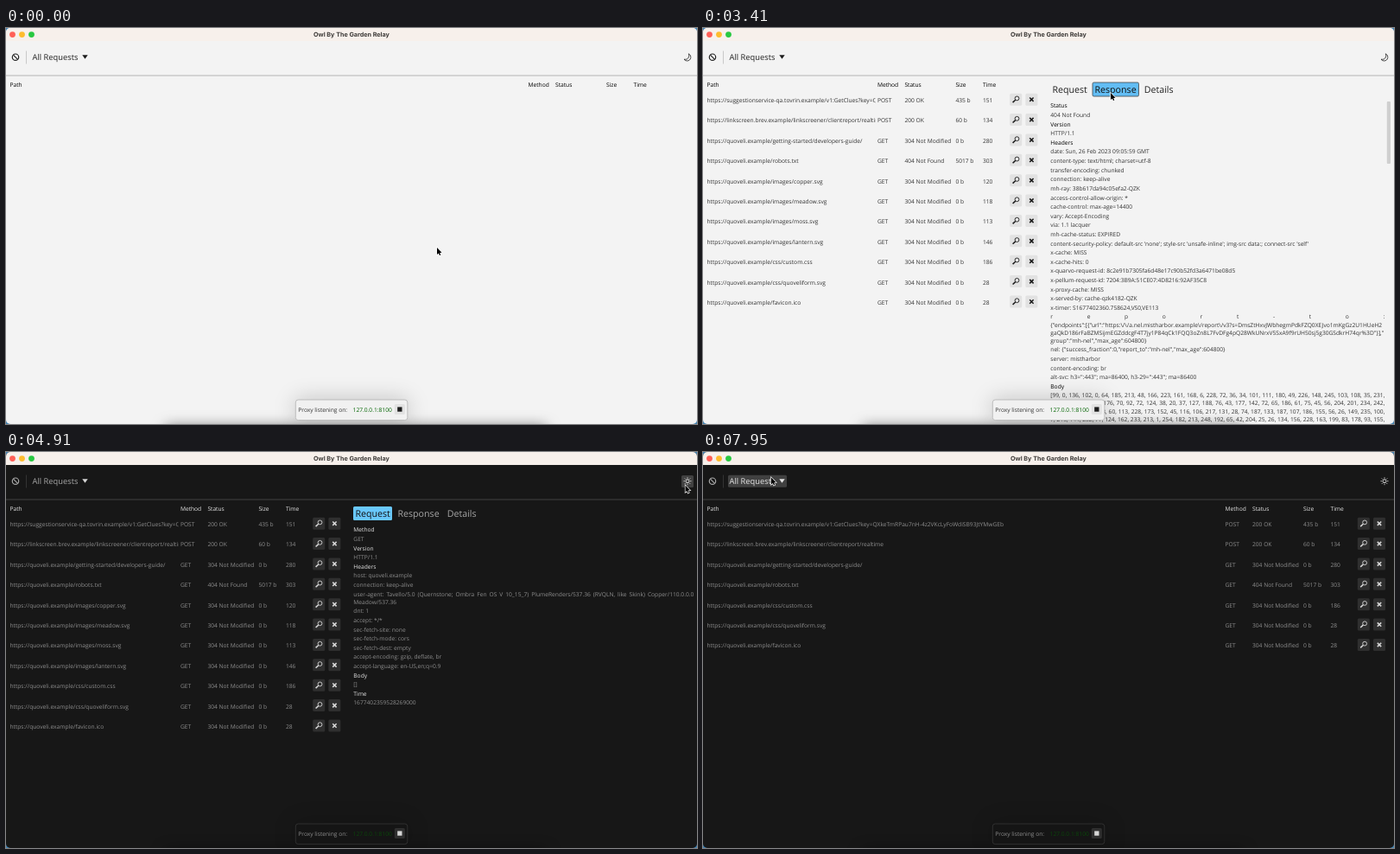
Animation, 800 px wide and 458 px high, one loop 8000 ms. Source, as an HTML page with a canvas:

```html
<!DOCTYPE html>
<html lang="en">
<head>
<meta charset="utf-8">
<title>Request list</title>
<style>
  html, body { margin: 0; width: 100%; height: 100%; overflow: hidden; }
  canvas { display: block; width: 800px; height: 458px; }
</style>
</head>
<body>
<canvas id="stage"></canvas>
<script>
const canvas = document.getElementById('stage');
const dpr = window.devicePixelRatio || 1;
canvas.width = 800 * dpr;
canvas.height = 458 * dpr;
const ctx = canvas.getContext('2d');
ctx.scale(dpr, dpr);
ctx.textRendering = 'geometricPrecision';

const LOOP = 8000;
const SMALL = 6.67, MEDIUM = 9.33, LARGE = 10.67;
const FONT = '"Open Sans", "Noto Sans", sans-serif';

const LIGHT = {
  bg: '#f3f3f3', text: '#333', strong: '#000', tool: '#222', icon: '#1c1c1c', line: '#b4b4b4', divider: '#c9c9c9',
  button: '#e2e2e2', hover: '#a0a0a0', edge: '#222', toast: '#f1f1f1', toastEdge: '#b2b2b2', address: '#006400'
};
const DARK = {
  bg: '#171717', text: '#8e8e8e', strong: '#e6e6e6', tool: '#a6a6a6', icon: '#d6d6d6', line: '#404040', divider: '#333',
  button: '#2f2f2f', hover: '#414141', edge: '#555', toast: '#151515', toastEdge: '#363636', address: '#0b460b'
};

// When each thing happens, in ms.
const BLUR = 590, FOCUS = 1860, OPEN = 2700, RESPONSE = 3200, REQUEST = 4100, TOGGLE = 4900, CLOSE = 5750;

const site = 'https://quoveli.example/';
const unchanged = '304 Not Modified';
// path, method, status, size, time, shown at, removed at
const rows = [
  ['https://suggestionservice-qa.tovrin.example/v1:GetClues?key=QXkeTmRPau7nH-4z2VKcLyFoWdiSB93JtYMwGEb', 'POST', '200 OK', '435 b', 151, 640],
  ['https://linkscreen.brev.example/linkscreener/clientreport/realtime', 'POST', '200 OK', '60 b', 134, 640],
  [site + 'getting-started/developers-guide/', 'GET', unchanged, '0 b', 280, 960],
  [site + 'robots.txt', 'GET', '404 Not Found', '5017 b', 303, 1110],
  [site + 'images/copper.svg', 'GET', unchanged, '0 b', 120, 1160, 6300],
  [site + 'images/meadow.svg', 'GET', unchanged, '0 b', 118, 1210, 5450],
  [site + 'images/moss.svg', 'GET', unchanged, '0 b', 113, 1260, 6500],
  [site + 'images/lantern.svg', 'GET', unchanged, '0 b', 146, 1310, 6700],
  [site + 'css/custom.css', 'GET', unchanged, '0 b', 186, 1360],
  [site + 'css/quoveliform.svg', 'GET', unchanged, '0 b', 28, 1410],
  [site + 'favicon.ico', 'GET', unchanged, '0 b', 28, 1460]
];

// time, x, y of the pointer tip
const pointerPath = [
  [0, 499, 254], [210, 499, 254], [270, 265, 223], [590, 265, 223], [640, 180, 210], [960, 180, 210],
  [1500, 87, 197], [1860, 87, 197], [2450, 762, 148.5], [2700, 762, 148.5], [3150, 472, 75], [3600, 472, 75],
  [4020, 424, 73], [4370, 424, 73], [4680, 786.5, 38.5], [5230, 786.5, 38.5], [5420, 380, 198], [5500, 380, 198],
  [5680, 361, 152], [5760, 361, 152], [5870, 427, 150.5], [6200, 782, 175], [6880, 782, 175],
  [7680, 140, 36], [7730, 140, 36], [7930, 79, 29.5], [8000, 79, 29.5]
];

let theme, pointer;

function pointerAt(t) {
  const i = pointerPath.findIndex(key => key[0] > t);
  const [t0, x0, y0] = pointerPath[i - 1], [t1, x1, y1] = pointerPath[i];
  const k = (t - t0) / (t1 - t0), ease = k * k * (3 - 2 * k);
  return { x: x0 + (x1 - x0) * ease, y: y0 + (y1 - y0) * ease };
}

function setFont(size, weight = 400, family = FONT) {
  ctx.font = `${weight} ${size}px ${family}`;
}

// y is the middle of the capitals.
function text(value, x, y, color = theme.text, size = SMALL) {
  setFont(size);
  ctx.fillStyle = color;
  ctx.fillText(value, x, y + size * 0.36);
}

function justify(parts, x, y, width) {
  setFont(SMALL);
  const widths = parts.map(part => ctx.measureText(part).width);
  const gap = parts.length > 1 ? (width - widths.reduce((a, b) => a + b)) / (parts.length - 1) : 0;
  parts.forEach((part, i) => {
    text(part, x, y);
    x += widths[i] + gap;
  });
}

function box(x, y, w, h, r, fill, edge) {
  ctx.beginPath();
  ctx.roundRect(x, y, w, h, r);
  ctx.fillStyle = fill;
  ctx.fill();
  if (edge) {
    ctx.strokeStyle = edge;
    ctx.lineWidth = 0.8;
    ctx.stroke();
  }
}

function dot(x, y, r, fill) {
  ctx.beginPath();
  ctx.arc(x, y, r, 0, 7);
  ctx.fillStyle = fill;
  ctx.fill();
}

function stroke(color, width, ...lines) {
  ctx.strokeStyle = color;
  ctx.lineWidth = width;
  ctx.beginPath();
  for (const [x0, y0, x1, y1] of lines) {
    ctx.moveTo(x0, y0);
    ctx.lineTo(x1, y1);
  }
  ctx.stroke();
}

function ring(x, y, r, color, width) {
  ctx.beginPath();
  ctx.arc(x, y, r, 0, 7);
  ctx.strokeStyle = color;
  ctx.lineWidth = width;
  ctx.stroke();
}

function hovered(x, y, w, h) {
  return pointer.x >= x && pointer.x <= x + w && pointer.y >= y && pointer.y <= y + h;
}

function polygon(points, fill) {
  ctx.beginPath();
  points.forEach(([x, y]) => ctx.lineTo(x, y));
  ctx.closePath();
  ctx.fillStyle = fill;
  ctx.fill();
}

// Response text, with a seeded token and body bytes.
let seed = 7;
const random = n => (seed = (seed * 16807) % 2147483647) % n;
const width = value => ctx.measureText(value).width;
const LETTERS = 'ABCDEFGHJKLMNPQRSTUVWXYZabcdefghijkmnopqrstuvwxyz0123456789';

function fill(start, limit, next) {
  let line = start;
  for (let more = line + next(); width(more) <= limit; more = line + next()) line = more;
  return line;
}

setFont(SMALL);
const letter = () => LETTERS[random(LETTERS.length)];
const byte = () => random(256) + ', ';
const tokenEnd = '%3D"}],"';
const tokenLines = [
  fill('{"endpoints":[{"url":"https:\\/\\/a.nel.mistharbor.example\\/report\\/v3?s=', 387, letter),
  fill('', 387 - width(tokenEnd), letter) + tokenEnd
];
const bodyLines = ['[99, 0, 136, 102, 0, 64, ', '', '', ''].map(start => fill(start, 389, byte).trim());

// '#' marks a heading; a line break continues a justified paragraph.
const responseText = [
  '#Status', '404 Not Found', '#Version', 'HTTP/1.1', '#Headers',
  'date: Sun, 26 Feb 2023 09:05:59 GMT', 'content-type: text/html; charset=utf-8', 'transfer-encoding: chunked',
  'connection: keep-alive', 'mh-ray: 38b617da94c05efa2-QZK', 'access-control-allow-origin: *',
  'cache-control: max-age=14400', 'vary: Accept-Encoding', 'via: 1.1 lacquer', 'mh-cache-status: EXPIRED',
  "content-security-policy: default-src 'none'; style-src 'unsafe-inline'; img-src data:; connect-src 'self'",
  'x-cache: MISS', 'x-cache-hits: 0', 'x-quarvo-request-id: 8c2e91b7305fa6d48e17c90b52fd3a6471be08d5',
  'x-pellum-request-id: 7204:3B9A:51CE07:4D8216:92AF35C8', 'x-proxy-cache: MISS',
  'x-served-by: cache-qzk4182-QZK', 'x-timer: S1677402360.758624,VS0,VE113',
  [...'report-to:'].join(' ') + '\n' + tokenLines.join('\n') + '\ngroup":"mh-nel","max_age":604800}',
  'nel: {"success_fraction":0,"report_to":"mh-nel","max_age":604800}', 'server: mistharbor',
  'content-encoding: br', 'alt-svc: h3=":443"; ma=86400, h3-29=":443"; ma=86400', '#Body',
  bodyLines.join('\n') + '\n'
];
const requestText = [
  '#Method', 'GET', '#Version', 'HTTP/1.1', '#Headers', 'host: quoveli.example', 'connection: keep-alive',
  'user-agent: Tavello/5.0 (Quernstone; Ombra Fen OS V 10_15_7) PlumeRenders/537.36 (RVQLN, like Skink) Copper/110.0.0.0\nMeadow/537.36',
  'dnt: 1', 'accept: */*', 'sec-fetch-site: none', 'sec-fetch-mode: cors', 'sec-fetch-dest: empty',
  'accept-encoding: gzip, deflate, br', 'accept-language: en-US,en;q=0.9', '#Body', '[]', '#Time', '1677402359528269000'
];

function drawTitleBar(focused) {
  ctx.fillStyle = focused ? '#f7f0eb' : '#e8e5df';
  ctx.fillRect(0, 0, 800, 15);
  const lights = focused ? ['#ff5f57', '#febc2e', '#28c840'] : ['#d0cdc8', '#d0cdc8', '#d0cdc8'];
  lights.forEach((color, i) => dot(7.5 + i * 11, 7.6, 3.4, color));
  setFont(7.2, 700, 'Inter, sans-serif');
  ctx.fillStyle = focused ? '#3d3a38' : '#9b9893';
  ctx.textAlign = 'center';
  ctx.fillText('Owl By The Garden Relay', 400, 10);
  ctx.textAlign = 'left';
}

function drawThemeIcon(dark) {
  if (hovered(782, 27, 14, 14)) box(782, 27, 14, 14, 1.5, theme.hover);
  if (dark) {
    ring(789, 33.7, 2, theme.icon, 1);
    const rays = Array.from({ length: 8 }, (_, i) => {
      const c = Math.cos(i * Math.PI / 4), s = Math.sin(i * Math.PI / 4);
      return [789 + c * 3.1, 33.7 + s * 3.1, 789 + c * 4.5, 33.7 + s * 4.5];
    });
    stroke(theme.icon, 0.9, ...rays);
  } else {
    ctx.beginPath();
    ctx.moveTo(790.3, 29.8);
    ctx.bezierCurveTo(794.5, 32, 793, 38, 788.6, 38);
    ctx.quadraticCurveTo(786.2, 38, 785, 36.2);
    ctx.bezierCurveTo(789, 37, 791.8, 34, 790.3, 29.8);
    ctx.strokeStyle = theme.icon;
    ctx.lineWidth = 0.8;
    ctx.stroke();
  }
}

function drawToolbar(dark) {
  ring(11, 33.7, 3.7, theme.tool, 1.2);
  stroke(theme.tool, 1.2, [8.4, 31.1, 13.6, 36.3]);
  stroke(theme.divider, 1, [23.5, 26.5, 23.5, 41.5]);
  const active = hovered(29, 27, 68, 14);
  if (active) box(29, 26.8, 68, 14, 1.5, theme.hover);
  const color = active ? theme.strong : theme.tool;
  text('All Requests', 30.5, 34, color, MEDIUM);
  polygon([[88.3, 31.3], [94.7, 31.3], [91.5, 35.8]], active ? theme.strong : theme.icon);
  drawThemeIcon(dark);
  stroke(theme.line, 1, [0, 55, 800, 55]);
}

function drawButton(x, y, icon) {
  const over = hovered(x - 7, y - 7, 14, 14);
  box(x - 7, y - 7, 14, 14, 1.5, over ? theme.hover : theme.button, over && theme.edge);
  if (icon === 'lens') {
    ring(x + 1.3, y - 1.3, 2.4, theme.icon, 0.9);
    stroke(theme.icon, 1.5, [x - 0.5, y + 0.5, x - 3.6, y + 3.4]);
  } else {
    stroke(theme.icon, 1.6, [x - 2.2, y - 2.2, x + 2.2, y + 2.2], [x + 2.2, y - 2.2, x - 2.2, y + 2.2]);
  }
}

function drawTable(t, split) {
  const shift = split ? -402.6 : 0;
  const columns = [604.5, 636, 695, 726.5].map(x => x + shift);
  text('Path', 4.5, 65.7, theme.strong);
  ['Method', 'Status', 'Size', 'Time'].forEach((name, i) => text(name, columns[i], 65.7, theme.strong));
  const visible = rows.filter(([, , , , , shown, removed = Infinity]) => t >= shown && t < removed);
  visible.forEach(([path, ...cells], i) => {
    const y = 83.7 + i * 23.38;
    ctx.save();
    ctx.beginPath();
    ctx.rect(0, y - 8, columns[0] - 2.5, 16);
    ctx.clip();
    text(path, 4.5, y);
    ctx.restore();
    columns.forEach((x, c) => text(cells[c], x, y));
    drawButton(764.8 + shift, y - 1, 'lens');
    drawButton(783 + shift, y - 1, 'cross');
  });
}

function drawTab(label, x, w, selected) {
  const over = hovered(x, 63, w, 16);
  if (selected) box(x, 63, w, 16, 1.5, over ? '#62bdf4' : '#69c8fc', over && '#444');
  else if (over) box(x, 63, w, 16, 1.5, theme.hover);
  text(label, x + 2.4, 71.3, selected ? '#111' : theme.tool, LARGE);
}

function drawPanel(response) {
  drawTab('Request', 402, 45, !response);
  drawTab('Response', 451, 53.5, response);
  drawTab('Details', 508.3, 39, false);
  let y = 90;
  for (const paragraph of response ? responseText : requestText) {
    const lines = paragraph.split('\n');
    lines.forEach((line, i) => {
      if (line[0] === '#') text(line.slice(1), 402.3, y, theme.strong);
      else if (i < lines.length - 1) justify(line.split(' '), 402.3, y, response ? 387 : 394);
      else text(line, 402.3, y);
      y += 9.1;
    });
    y += 1.51;
  }
  if (response) box(791.8, 85, 4.2, 72, 1, theme === DARK ? '#444' : '#cfcfcf');
}

function drawToast() {
  ctx.save();
  ctx.shadowColor = 'rgba(0,0,0,.55)';
  ctx.shadowBlur = 16 * dpr;
  ctx.fillStyle = '#000';
  ctx.fillRect(185, 461, 440, 30);
  ctx.shadowColor = 'rgba(0,0,0,.22)';
  ctx.shadowBlur = 26 * dpr;
  box(335.3, 430, 129.5, 23.6, 3, theme.toast);
  ctx.restore();
  box(335.3, 430, 129.5, 23.6, 3, theme.toast, theme.toastEdge);
  text('Proxy listening on:', 338.3, 442);
  text('127.0.0.1:8100', 401.6, 442, theme.address);
  box(449.8, 435, 12, 12, 1.5, theme.button);
  ctx.fillStyle = theme.icon;
  ctx.fillRect(453.2, 438.4, 5.3, 5.3);
}

function drawTooltip() {
  box(751.4, 44.5, 52, 14.6, 1.5, '#ebebeb', '#aaa');
  text('Toggle theme', 755, 52);
}

function drawPointer() {
  ctx.save();
  ctx.translate(pointer.x, pointer.y);
  const shape = [[0, 0], [0, 8], [1.8, 6.4], [3, 9.1], [4.3, 8.5], [3.1, 5.9], [5.5, 5.7]];
  polygon(shape, '#000');
  ctx.strokeStyle = '#fff';
  ctx.lineWidth = 1.3;
  ctx.stroke();
  polygon(shape, '#000');
  ctx.restore();
}

function draw(t) {
  const dark = t >= TOGGLE, split = t >= OPEN && t < CLOSE;
  theme = dark ? DARK : LIGHT;
  pointer = pointerAt(t);
  ctx.fillStyle = '#4584b4';
  ctx.fillRect(0, 0, 800, 458);
  ctx.save();
  ctx.beginPath();
  ctx.roundRect(0, 0, 800, 458, 5);
  ctx.clip();
  ctx.fillStyle = theme.bg;
  ctx.fillRect(0, 0, 800, 458);
  drawTitleBar(t < BLUR || t >= FOCUS);
  drawToolbar(dark);
  drawTable(t, split);
  if (split) drawPanel(t >= RESPONSE && t < REQUEST);
  drawToast();
  if (!dark && hovered(782, 27, 14, 14)) drawTooltip();
  ctx.restore();
  drawPointer();
}

function frame() {
  draw(performance.now() % LOOP);
  requestAnimationFrame(frame);
}
frame();
</script>
</body>
</html>
```
